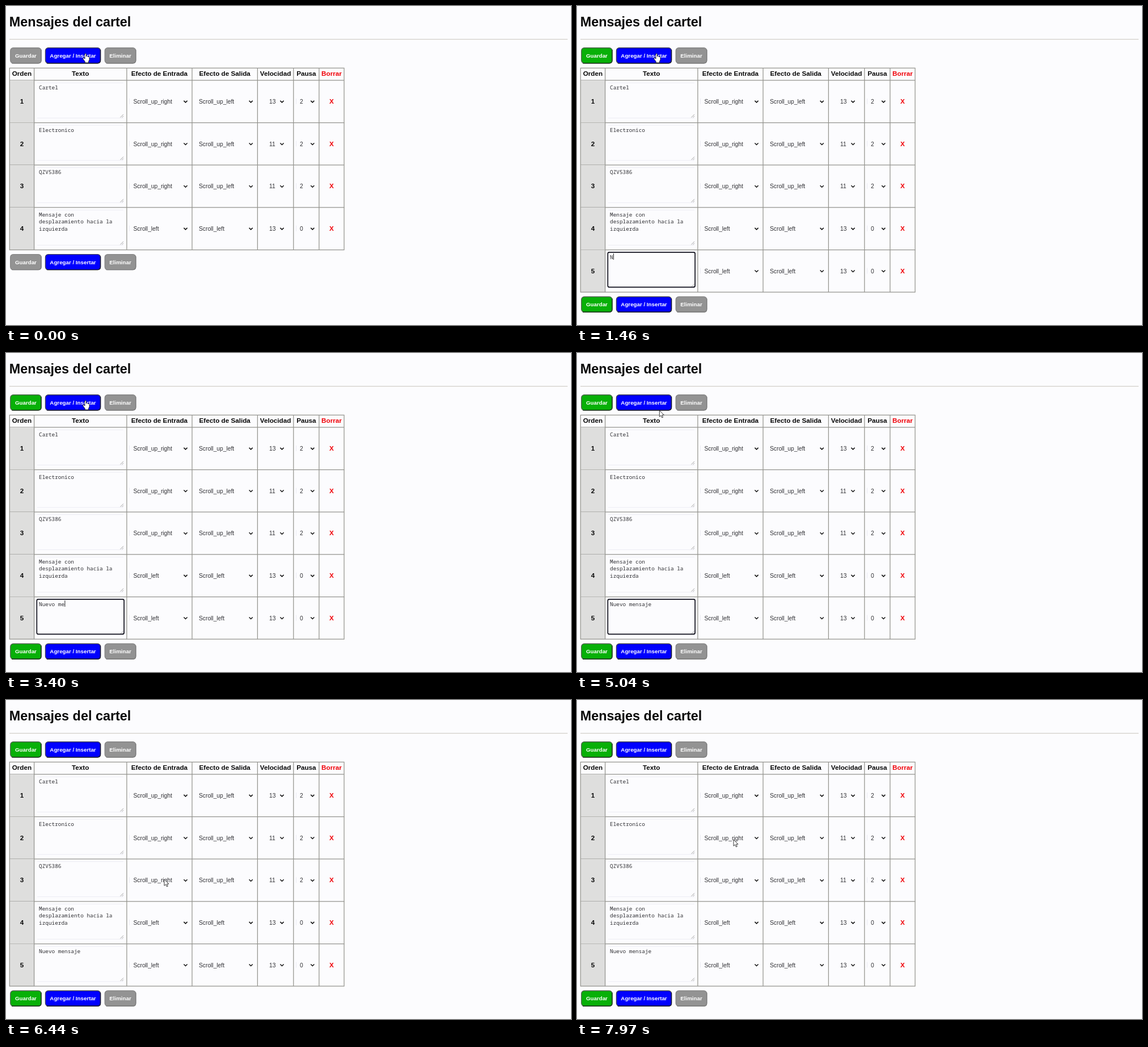
Animation of 996x562 px, one loop 8000 ms. Source, as an HTML page:

```html
<!DOCTYPE html>
<html lang="es">
<head>
<meta charset="utf-8">
<title>Mensajes del cartel</title>
<style>
  html, body { margin: 0; width: 100%; height: 100%; overflow: hidden; background: #fcfcfe; }
  svg { display: block; width: 100%; height: 100%; }
  text { font-family: "Liberation Sans", Arial, sans-serif; white-space: pre; }
  .title { font-size: 23.4px; font-weight: bold; fill: #080808; }
  .head { font-size: 11.7px; font-weight: bold; fill: #080808; text-anchor: middle; }
  .head.red { fill: #f00008; }
  .button { font-size: 9.76px; font-weight: bold; fill: #fff; text-anchor: middle; }
  .option { font-size: 10.25px; fill: #303034; }
  .mono { font: 9.4px "Noto Sans Mono", monospace; fill: #303034; }
  .grid { fill: none; stroke: #94948e; stroke-width: 1.25; }
  .chevron { fill: none; stroke: #111; stroke-width: 1.5; }
  .faint { fill: none; stroke: #ececf3; stroke-width: 1; }
  .grip { fill: none; stroke: #8c8c8c; stroke-width: .8; }
</style>
</head>
<body>
<svg id="stage" viewBox="0 0 996 562"></svg>
<script>
const LOOP = 8000, ADD_ROW = 450, BLUR = 6200;
const TOP = 130.9, ROW = 74.65;
const EDGES = [6.3, 49.6, 212.9, 328, 443.4, 506.8, 551.9, 596];
const MESSAGE = 'Nuevo mensaje';
const KEY_TIMES = [1460, 1640, 1800, 1960, 2290, 2550, 2880, 3200, 3560, 3740, 3920, 4140, 4340];
const POINTER = [[4750, 140, 84], [5040, 145.3, 101], [5300, 158, 130], [5800, 275, 310],
  [6000, 279, 316], [7300, 279, 316], [7800, 276, 246]];
const ROWS = [
  [['Cartel'], 'up_right', 'up_left', 13, 2],
  [['Electronico'], 'up_right', 'up_left', 11, 2],
  [['QZV5386'], 'up_right', 'up_left', 11, 2],
  [['Mensaje con', 'desplazamiento hacia la', 'izquierda'], 'left', 'left', 13, 0],
  [[''], 'left', 'left', 13, 0]
];

const stage = document.getElementById('stage');

function add(parent, tag, attrs = {}, content = '') {
  const node = document.createElementNS('http://www.w3.org/2000/svg', tag);
  for (const key in attrs) node.setAttribute(key, attrs[key]);
  node.textContent = content;
  return parent.appendChild(node);
}
const group = parent => add(parent, 'g');
const path = (parent, cls, d) => add(parent, 'path', { class: cls, d });
const label = (parent, cls, x, y, content) => add(parent, 'text', { class: cls, x, y }, content);
const center = i => (EDGES[i] + EDGES[i + 1]) / 2;
const show = (node, on) => node.setAttribute('visibility', on ? 'visible' : 'hidden');

function button(parent, x, width, content, fill, light, dark) {
  const box = { x: x + .7, y: 73.7, width: width - 1.4, height: 27, rx: 5, 'stroke-width': 1.4 };
  const body = add(parent, 'rect', { ...box, fill, stroke: light });
  const shade = path(parent, '', `M${x + 3} 100.7H${x + width - 5.7}q5 0 5-5V77`);
  shade.setAttribute('fill', 'none');
  shade.setAttribute('stroke', dark);
  shade.setAttribute('stroke-width', 1.4);
  label(parent, 'button', x + width / 2, 90.7, content);
  return { body, shade };
}

function toolbar() {
  const bar = group(stage);
  const save = button(bar, 7.1, 55.6, 'Guardar', '#939393', '#868686', '#7c7c7c');
  button(bar, 68.8, 98.4, 'Agregar / Insertar', '#0000fe', '#404058', '#101030');
  button(bar, 173.6, 55.8, 'Eliminar', '#939393', '#868686', '#7c7c7c');
  return { bar, save };
}

function select(parent, textX, arrowX, y, content) {
  label(parent, 'option', textX, y + 41, content);
  path(parent, 'chevron', `M${arrowX - 3.1} ${y + 36}l3.1 3 3.1-3`);
}

function tableRow([lines, enter, leave, speed, pause], i) {
  const g = group(stage), y = TOP + i * ROW;
  add(g, 'rect', { x: EDGES[0], y, width: EDGES[1] - EDGES[0], height: ROW, fill: '#dededd' });
  path(g, 'grid', EDGES.map(x => `M${x} ${y}v${ROW}`).join('') +
    `M${EDGES[0] - .6} ${y + ROW}H${EDGES[7] + .6}`);
  label(g, 'head', center(0), y + 41.2, i + 1);
  path(g, 'faint', `M55 ${y + 4.5}h152M55 ${y + 66.5}h152M217.5 ${y + 32}v10M511.5 ${y + 32}v10`);
  path(g, 'grip', `M201.5 ${y + 65.5}l5.5-5.5M204.6 ${y + 65.5}l2.4-2.4`);
  const texts = lines.map((line, n) => label(g, 'mono', 58, y + 16 + n * 12.4, line));
  select(g, 224.5, 316.5, y, 'Scroll_' + enter);
  select(g, 340, 431.7, y, 'Scroll_' + leave);
  select(g, 464, 486.5, y, speed);
  select(g, 518, 540.3, y, pause);
  label(g, 'head red', center(6), y + 41.2, 'X');
  return { g, y, text: texts[0] };
}

label(stage, 'title', 5.8, 36.4, 'Mensajes del cartel');
add(stage, 'rect', { x: 6, y: 58, width: 984, height: 1.2, fill: '#d0cec8' });
const bars = [toolbar(), toolbar()];

path(stage, 'grid', EDGES.map(x => `M${x} 109.3V${TOP}`).join('') +
  `M${EDGES[0] - .6} 109.3H${EDGES[7] + .6}M${EDGES[0]} ${TOP}H${EDGES[7]}`);
['Orden', 'Texto', 'Efecto de Entrada', 'Efecto de Salida', 'Velocidad', 'Pausa', 'Borrar']
  .forEach((name, i) => label(stage, i === 6 ? 'head red' : 'head', center(i), 123.4, name));

const newRow = ROWS.map(tableRow).pop();
const focus = group(newRow.g);
add(focus, 'rect', { x: 54.3, y: newRow.y + 4.4, width: 153.8, height: 61.4, rx: 2.5,
  fill: 'none', stroke: '#10101c', 'stroke-width': 1.7 });
const caret = add(focus, 'rect', { y: newRow.y + 6.5, width: .9, height: 11, fill: '#111' });

const outline = { fill: '#fff', stroke: '#222', 'stroke-width': .9, 'stroke-linejoin': 'round' };
const hand = add(stage, 'path', { ...outline, d: 'M139 84.5q1.3-1.5 2.4 0v4.2q1.2-.9 2 .3 1.2-.7 1.9.5 1.5-.4 1.7 1v4.2l-1.5 3v2.3h-6.2v-2l-3.8-5.2q0-1.8 1.7-1.2l1.8 1.5z' });
const arrow = add(stage, 'path', { ...outline, d: 'M0 0V11.2L2.6 8.8 4.4 12.8 6.3 12 4.5 8.1H8Z' });

function pointerAt(t) {
  const next = POINTER.findIndex(p => p[0] > t);
  if (next < 0) return POINTER[POINTER.length - 1].slice(1);
  if (next === 0) return POINTER[0].slice(1);
  const [t0, x0, y0] = POINTER[next - 1], [t1, x1, y1] = POINTER[next];
  const k = (t - t0) / (t1 - t0);
  return [x0 + (x1 - x0) * k, y0 + (y1 - y0) * k];
}

function caretOn(t, typed) {
  const since = t - (typed ? KEY_TIMES[typed - 1] : ADD_ROW);
  return since % 1000 < 500;
}

function draw(t) {
  const added = t >= ADD_ROW, focused = added && t < BLUR;
  const typed = KEY_TIMES.filter(time => time <= t).length;
  show(newRow.g, added);
  show(focus, focused);
  show(caret, focused && caretOn(t, typed));
  newRow.text.textContent = MESSAGE.slice(0, typed);
  caret.setAttribute('x', 58.3 + typed * 5.64);

  bars[1].bar.setAttribute('transform', `translate(0 ${added ? 438.5 : 363.9})`);
  for (const { save } of bars) {
    save.body.setAttribute('fill', added ? '#08b008' : '#939393');
    save.body.setAttribute('stroke', added ? '#4c664c' : '#868686');
    save.shade.setAttribute('stroke', added ? '#183818' : '#7c7c7c');
  }

  const moving = t >= 4980;
  const [x, y] = pointerAt(t);
  show(hand, !moving);
  show(arrow, moving);
  hand.setAttribute('transform', `translate(${x - 140} ${y - 84})`);
  arrow.setAttribute('transform', `translate(${x} ${y})`);
}

const start = performance.now();
function tick() {
  draw((performance.now() - start) % LOOP);
  requestAnimationFrame(tick);
}
tick();
</script>
</body>
</html>
```
